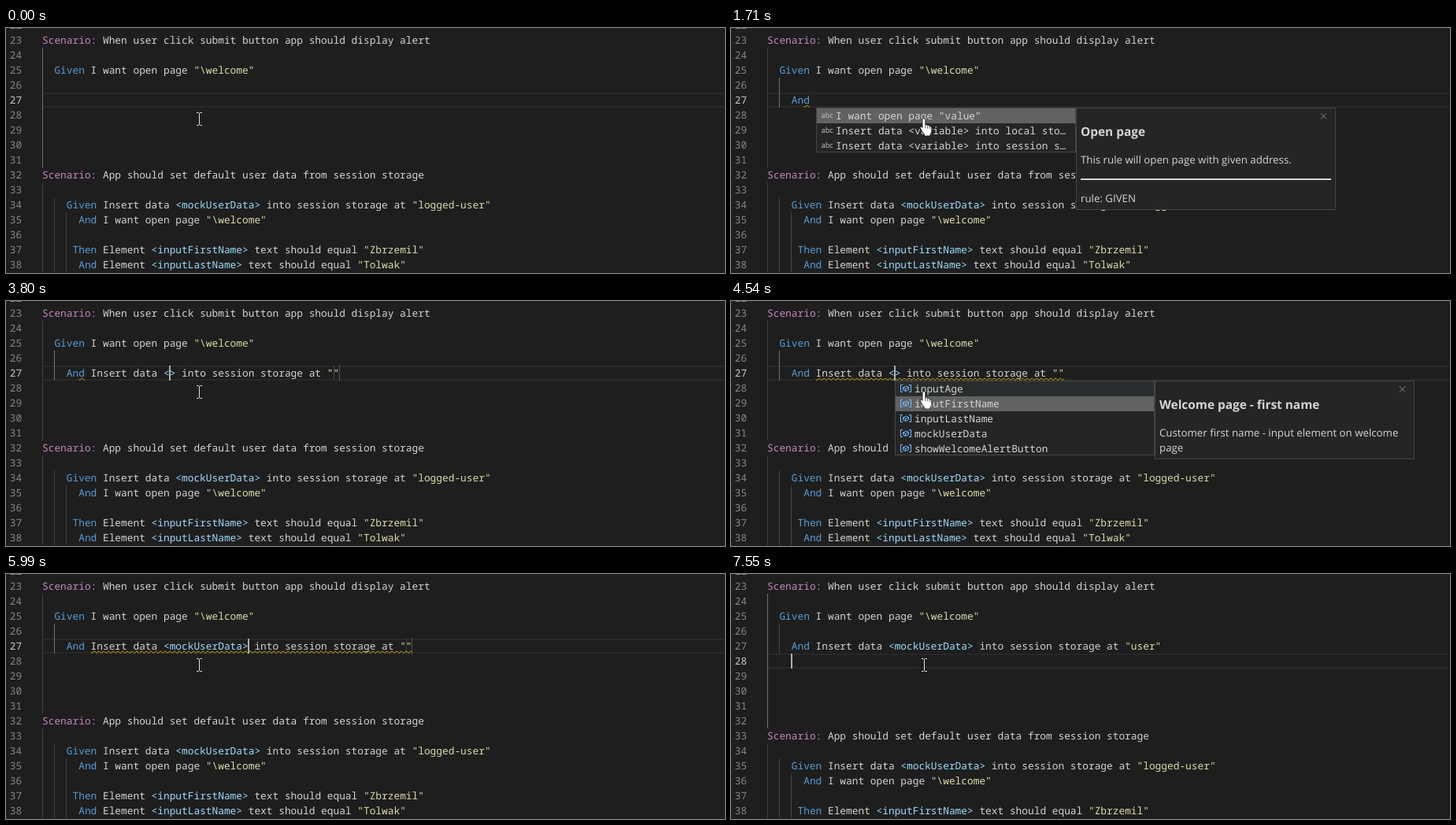
Recreate the animation shown at these times as an HTML page. Size 913 by 311 pixels, loop 8.52 s.

```html
<!DOCTYPE html>
<html lang="en">
<head>
<meta charset="utf-8">
<title>Editor autocompletion</title>
<style>
  html, body { margin: 0; width: 100%; height: 100%; overflow: hidden; background: #1e1e1e; }
  svg { display: block; width: 913px; height: 311px; }
  text { white-space: pre; text-rendering: geometricPrecision; fill: #d4d4d4; }
  .mono { font: 12.83px "Noto Sans Mono", "DejaVu Sans Mono", monospace; }
  .bold { font-weight: 700; }
  .doc { font: 13.28px "Open Sans", "Noto Sans", sans-serif; }
  .title { font: 700 15.4px "Open Sans", "Noto Sans", sans-serif; }
  .abc { font: 9.3px "Open Sans", "Noto Sans", sans-serif; }
</style>
</head>
<body>
<svg id="stage" viewBox="0 0 913 311"></svg>
<script>
const LOOP = 8520, LEFT = 46, CHAR = 7.698, ROW = 19;
const stage = document.getElementById('stage');

const colX = col => LEFT + col * CHAR;
const rowTop = n => 6 + ROW * (n - 23);
const esc = s => s.replace(/&/g, '&amp;').replace(/</g, '&lt;').replace(/>/g, '&gt;');
const rect = (x, y, w, h, fill, more = '') =>
  `<rect x="${x}" y="${y}" width="${w}" height="${h}" fill="${fill}" ${more}/>`;
const label = (x, y, s, cls, fill) =>
  `<text x="${x}" y="${y}" class="${cls}"${fill ? ` style="fill:${fill}"` : ''}>${esc(s)}</text>`;
const stroke = (d, color, w = 1) => `<path d="${d}" fill="none" stroke="${color}" stroke-width="${w}"/>`;

// Completion lists: items are [label, documentation]
const storageText = ['This rule will put some object into session storage.', 'This helper'];
const field = name => ({
  title: `Welcome page - ${name}`,
  body: name === 'age'
    ? ['Customer age - input element on welcome page']
    : [`Customer ${name} - input element on welcome`, 'page'],
});
const keywords = { col: 4, width: 430, bold: true, items: [['And'], ['Then'], ['When']] };
const rules = { col: 8, width: 330, items: [
  ['I want open page "value"',
    { title: 'Open page', body: ['This rule will open page with given address.'], extra: ['rule: GIVEN'] }],
  ['Insert data <variable> into local sto…',
    { title: 'Insert data into local storage', body: storageText, extra: ['rule: GIVEN'] }],
  ['Insert data <variable> into session s…',
    { title: 'Insert data into session storage', body: storageText, extra: ['rule: GIVEN'] }],
] };
const variables = { col: 21, width: 330, brackets: true, items: [
  ['inputAge', field('age')],
  ['inputFirstName', field('first name')],
  ['inputLastName', field('last name')],
  ['mockUserData', { title: 'Mock user data', body: ['User data stored in session'],
    extra: ['{', '    firstName: "Zbrzemil",', '    lastName: "Tolwak"', '}'] }],
  ['showWelcomeAlertButton'],
] };

const typed = (name, value) => `    And Insert data <${name}> into session storage at "${value}"`;
const typing = value => ({ line: typed('mockUserData', value), caret: 60 + value.length, stop: 61 + value.length });

// Each step changes part of the state from its time on
const steps = [
  [0, { line: '', caret: null, list: null, sel: 0, warn: null, slot: null, stop: null, nested: false, added: 0 }],
  [980, { list: keywords }],
  [1660, { line: '    And ', caret: 8, list: null, nested: true }],
  [1710, { list: rules, caret: null, warn: [6, 7] }],
  [2460, { sel: 1, caret: 8 }],
  [3140, { sel: 2, caret: null }],
  [3800, { line: typed('', ''), list: null, sel: 0, caret: 21, slot: 48, stop: 49 }],
  [3860, { list: variables, warn: [8, 49], slot: null, stop: null }],
  [4540, { sel: 1 }],
  [4920, { sel: 2 }],
  [5310, { sel: 3, caret: null }],
  [5990, { list: null, line: typed('mockUserData', ''), caret: 34, warn: [8, 61], slot: 60, stop: 61 }],
  [6060, { caret: 60, slot: null }],
  [6160, { warn: null }],
  [6780, typing('u')],
  [6930, typing('us')],
  [7090, typing('use')],
  [7180, typing('user')],
  [7410, { caret: 65, stop: null }],
  [7480, { added: 1, caret: 4, nested: false }],
];

const colors = [
  [/^Scenario:/, '#c586c0'],
  [/^(Given|And|Then)$/, '#569cd6'],
  [/^</, '#9cdcfe'],
  [/^"/, '#dcdcaa'],
];

function codeLine(n, source) {
  const code = source.trimStart();
  const tokens = code.match(/^\w+:?|<\w*>|"[^"]*"|[^<"]+/g) || [];
  const spans = tokens.map(t => {
    const hit = colors.find(([re]) => re.test(t));
    return `<tspan style="fill:${hit ? hit[1] : '#d4d4d4'}">${esc(t)}</tspan>`;
  }).join('');
  return `<text x="${colX(source.length - code.length)}" y="${rowTop(n) + 14}" class="mono">${spans}</text>`;
}

function guide(col, from, to, active) {
  const y = rowTop(from);
  return rect(Math.floor(colX(col)), y, 1, rowTop(to + 1) - y, active ? '#707070' : '#404040');
}

function squiggle([from, to]) {
  const x = colX(from), end = colX(to);
  let d = `M${x} 99.3`;
  for (let i = x; i < end - 1; i += 6) d += 'l1.6 1.2l3-2.6l1.4 1.4';
  return `<clipPath id="warn">${rect(x, 97, end - x, 5, '#fff')}</clipPath>` +
    `<g clip-path="url(#warn)">${stroke(d, '#cca700')}</g>`;
}

function panel(x, { title, body, extra = [] }) {
  let y = 172 + ROW * (body.length - 1);
  let out = label(x + 6, 137, title, 'title') +
    body.map((s, i) => label(x + 6, 172 + ROW * i, s, 'doc')).join('');
  if (extra.length) {
    out += rect(x + 6, y + 19, 318, 2, '#d4d4d4');
    out += extra.map((s, i) => label(x + 6, y + 49 + 18.3 * i, s, 'doc')).join('');
    y += 49 + 18.3 * (extra.length - 1);
  }
  const height = Math.round(y + 10) - 101;
  return rect(x + .5, 101.5, 329, height - 1, '#252526', 'stroke="#454545"') + out +
    stroke(`M${x + 311} 108.5l7 7m0-7l-7 7`, '#8a8a8a');
}

function popup({ col, width, bold, brackets, items }, sel) {
  const x = Math.round(colX(col)), height = ROW * items.length;
  let out = rect(x, 101, width, height, '#252526');
  items.forEach(([name], i) => {
    const y = 102 + ROW * i;
    const fill = i === sel ? '#626262' : i === 0 ? '#2a2d2e' : '';
    if (fill) out += rect(x + 1, y, width - 2, i === items.length - 1 ? 17 : 19, fill);
    out += brackets
      ? stroke(`M${x + 10} ${y + 4.5}h-2.5v9h2.5M${x + 18} ${y + 4.5}h2.5v9h-2.5` +
          `M${x + 10.5} ${y + 8}l4-2l3 1.5v3l-4 2l-3-1.5zl3 1.5l4-2m-4 2v3`, '#75beff')
      : label(x + 6.5, y + 12, 'abc', 'abc', '#c5c5c5');
    out += label(x + 25, y + 14, name, bold ? 'mono bold' : 'mono');
  });
  out += rect(x + .5, 101.5, width - 1, height - 1, 'none', 'stroke="#454545"');
  const doc = items[sel][1];
  return out + (doc ? panel(x + width, doc) : '');
}

const beam = stroke('M242 107.5h2.5l1 1l1-1h2.5M245.5 108v15M242 123.5h2.5l1-1l1 1h2.5', '#e0e0e0');
const hand = '<path d="M243 117q0-2.500 1.900-2.500t1.900 2.500v6q2.300-1 2.900 .8q2-.8 2.600 .9q2.400-.4 2.400 2v4' +
  'q0 2.300-1.700 4v2.300h-7.500v-2q-2.500-2.500-4.300-6.500q-1.500-2.600-.3-3.400q1.300-.6 2.100 1.400z" ' +
  'fill="#fff" stroke="#111" stroke-width=".8"/>' + stroke('M246.800 123v4M249.700 124v3.500M252.300 125v3', '#222', .7);

function draw(s) {
  const current = 27 + s.added, next = 32 + s.added;
  let out = rect(LEFT, rowTop(current), 867, 2, '#282828') + rect(LEFT, rowTop(current) + 17, 867, 2, '#282828');

  out += guide(0, 24, next - 1, !s.nested);
  if (s.line) out += guide(2, 26, 27, s.nested);
  [0, 2, 4].forEach((col, i) => out += guide(col, next + 1 + i, 38));

  for (let n = 22; n < 39; n++)
    out += label(4.8, rowTop(n) + 14, String(n), 'mono', n === current ? '#c6c6c6' : '#858585');

  const code = [
    [23, 'Scenario: When user click submit button app should display alert'],
    [25, '  Given I want open page "\\welcome"'],
    [27, s.line],
    [next, 'Scenario: App should set default user data from session storage'],
    [next + 2, '    Given Insert data <mockUserData> into session storage at "logged-user"'],
    [next + 3, '      And I want open page "\\welcome"'],
    [next + 5, '     Then Element <inputFirstName> text should equal "Zbrzemil"'],
    [next + 6, '      And Element <inputLastName> text should equal "Tolwak"'],
  ];
  out += code.filter(([n]) => n < 39).map(([n, source]) => codeLine(n, source)).join('');

  if (s.slot) out += rect(Math.round(colX(s.slot)), 82, 1, 19, '#454545');
  if (s.stop) out += rect(Math.floor(colX(s.stop)), 81, 1, 21, '#525252');
  if (s.warn) out += squiggle(s.warn);
  if (s.caret !== null) out += rect(Math.floor(colX(s.caret)), rowTop(current), 2, ROW, '#aeafad');
  if (s.list) out += popup(s.list, s.sel);
  stage.innerHTML = out + (s.list ? hand : beam);
}

const start = performance.now();
let shown = 0;
function frame() {
  const t = (performance.now() - start) % LOOP;
  const count = steps.filter(([at]) => at <= t).length;
  if (count !== shown) {
    shown = count;
    draw(Object.assign({}, ...steps.slice(0, count).map(([, change]) => change)));
  }
  requestAnimationFrame(frame);
}
frame();
</script>
</body>
</html>
```
